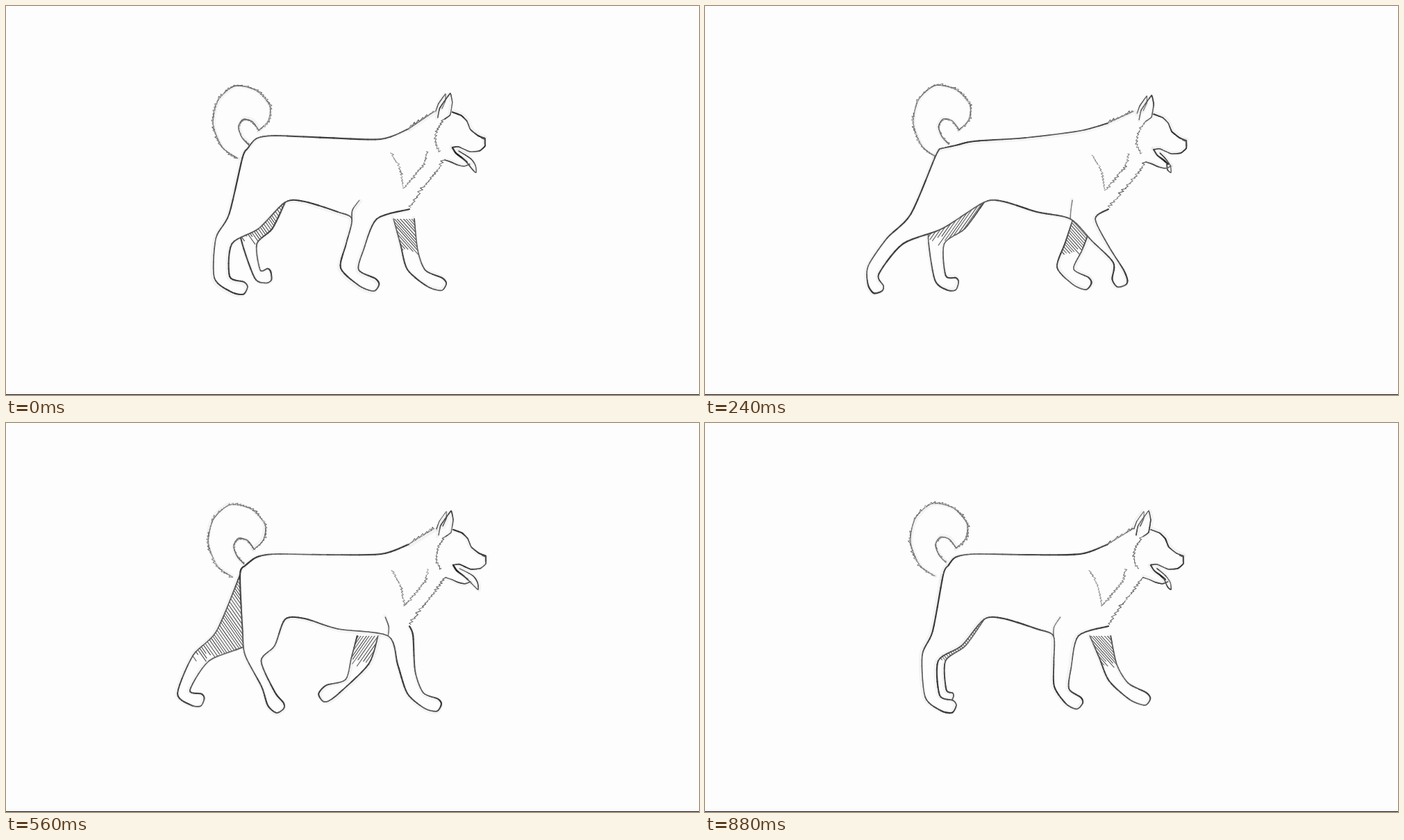
These frames come from a looping animation (998 by 561 pixels, 0.96 s). An HTML page with a canvas:

```html
<!DOCTYPE html>
<html lang="en">
<head>
<meta charset="utf-8">
<title>Walking dog</title>
<style>
  html, body { margin: 0; width: 100%; height: 100%; overflow: hidden; background: #fdfdfd; }
  canvas { display: block; }
</style>
</head>
<body>
<canvas id="stage" width="998" height="561"></canvas>
<script>
const ctx = document.getElementById('stage').getContext('2d');
const PAPER = '#fdfdfd', TICK = 80, TICKS = 12;

// Gait: heel and toe tip of each foot at the key ticks; everything else follows by rule
const KEY_TICKS = [0, 1, 3, 5, 7, 9, 11];
const GAIT = {
  nearHind: [[300,392, 346,410], [259,388, 301,410], [235,375, 250,413], [294,380, 304,405],
    [368,380, 396,415], [346,398, 390,413], [317,395, 360,412]],
  farHind: [[358,392, 382,388], [370,393, 403,402], [331,395, 364,403], [278,388, 325,406],
    [247,390, 284,402], [243,372, 238,402], [334,388, 355,400]],
  nearFront: [[482,378, 535,406], [482,370, 451,393], [588,370, 601,404], [596,372, 650,414],
    [578,390, 625,410], [535,385, 579,406], [503,380, 541,408]],
  farFront: [[578,380, 632,405], [555,380, 610,406], [507,377, 554,404], [478,375, 525,404],
    [489,370, 453,397], [580,372, 611,396], [582,372, 639,402]]
};
const FLANK = [402, 283], CHEST = [581, 293];

const add = ([x, y], dx, dy) => [x + dx, y + dy];
const mix = (a, b, f) => a.map((v, k) => v + (b[k] - v) * f);
const shift = (pts, [dx, dy]) => pts.map(p => add(p, dx, dy));

let seed = 1;
const rand = () => (seed = seed * 16807 % 2147483647) / 2147483647;

function footAt(name, tick) {
  const i = KEY_TICKS.findLastIndex(k => k <= tick), next = (i + 1) % KEY_TICKS.length;
  const from = KEY_TICKS[i], to = KEY_TICKS[next] || TICKS;
  const [hx, hy, tx, ty] = mix(GAIT[name][i], GAIT[name][next], (tick - from) / (to - from));
  return { heel: [hx, hy], tip: [tx, ty] };
}

// Paw outline from heel round the sole and toes to the instep
function paw({ heel, tip }) {
  const dx = tip[0] - heel[0], dy = tip[1] - heel[1], length = Math.hypot(dx, dy);
  const at = (along, down) =>
    add(heel, dx * along - dy / length * down, dy * along + dx / length * down);
  return [heel, at(0.6, 10), at(0.96, 7), at(1, -5), at(0.85, -10), at(0.4, -10)];
}

function hindLeg(rump, foot) {
  const hock = [306 + (foot.heel[0] - 306) * 0.62, 335], shin = add(hock, 23, 8);
  return [rump, [(rump[0] + hock[0]) / 2, 300], hock, ...paw(foot), shin,
    add(mix(shin, FLANK, 0.45), 4, 5), FLANK];
}

function frontLeg(elbow, foot, width) {
  const middle = mix(elbow, foot.heel, 0.5);
  return [elbow, middle, ...paw(foot), add(middle, 25, 9), add(elbow, width, 0)];
}

// Smooth polyline through the points
function curve(pts, tension = 0.4, steps = 7) {
  const out = [];
  for (let i = 0; i < pts.length - 1; i++) {
    const p = pts[i], q = pts[i + 1], before = pts[i - 1] || p, after = pts[i + 2] || q;
    for (let s = 0; s < steps; s++) {
      const t = s / steps, t2 = t * t, t3 = t2 * t;
      out.push([0, 1].map(k =>
        (2 * t3 - 3 * t2 + 1) * p[k] + (3 * t2 - 2 * t3) * q[k] +
        (t3 - 2 * t2 + t) * tension * (q[k] - before[k]) + (t3 - t2) * tension * (after[k] - p[k])));
    }
  }
  return [...out, pts[pts.length - 1]];
}

function trace(pts) {
  ctx.beginPath();
  pts.forEach(p => ctx.lineTo(...p));
}

function line(pts, width, tone) {
  ctx.lineWidth = width;
  ctx.strokeStyle = `rgb(${tone},${tone},${tone})`;
  trace(pts);
  ctx.stroke();
}

// Pencil line with uneven pressure and a faint smudge
function pencil(pts, width = 1.8, tone = 82, tension = 0.4) {
  const path = curve(pts, tension), phase = rand() * 6;
  ctx.globalAlpha = 0.07;
  line(shift(path, [rand() * 4 - 2, rand() * 4 - 2]), 5, 110);
  ctx.globalAlpha = 1;
  for (let i = 1; i < path.length; i++) {
    const press = Math.sin(i * 0.23 + phase) * 0.6 + rand() * 0.4;
    line([path[i - 1], path[i]], width * (1 + press * 0.22), tone - press * 28);
  }
}

// Short overlapping hairs along a curve
function fur(pts, side = 1, size = 3, tone = 120) {
  let last;
  for (const p of curve(pts, 0.4, 16)) {
    if (last) {
      const dx = p[0] - last[0], dy = p[1] - last[1], d = Math.hypot(dx, dy);
      if (d < 4) continue;
      const h = side * size * (0.2 + rand() * 0.9) / d;
      line([last, [p[0] + dy * h, p[1] - dx * h], p], 0.9 + rand() * 0.5, tone + rand() * 40 - 20);
    }
    last = p;
  }
}

function farLeg(pts, slope, top, end) {
  trace(curve(pts));
  ctx.fillStyle = PAPER;
  ctx.fill();
  ctx.save();
  ctx.clip();
  for (let x = 120; x < 760; x += 3.5 + rand() * 1.4) {
    const y = end - rand() * 14;
    line([[x, top], [x + slope * (y - top), y]], 1.2, 80 + rand() * 35);
  }
  ctx.restore();
  pencil(pts, 1.7, 88);
}

function drawTail(offset) {
  const outer = shift([[334,219],[312,203],[299,170],[306,136],[330,115],[360,121],[380,143],[378,165],[363,180]], offset);
  const inner = shift([[365,179],[355,166],[342,163],[335,174],[340,189],[350,200]], offset);
  pencil(outer, 0.9, 140);
  fur(outer, 1, 3, 120);
  pencil(inner, 1.1, 105);
  fur(inner, 1, 2, 125);
}

function drawHead(offset, tongueSwing) {
  const at = pts => shift(pts, offset);
  pencil(at([[619,152],[623,141],[633,127],[633,137],[628,148]]), 1.1, 105, 0.15);
  pencil(at([[622,161],[625,147],[640,126],[643,139],[640,157],[632,163]]), 1.4, 85, 0.15);
  pencil(at([[643,153],[656,158],[664,166],[669,178],[680,187],[690,191]]), 1.7, 75, 0.2);
  pencil(at([[690,191],[690,202],[682,209],[668,210],[652,203],[643,204]]), 1.5, 75, 0.25);
  line(at([[685,190],[690,192],[690,199]]), 2.2, 80);
  pencil(at([[643,204],[648,212],[657,219],[664,225]]), 2, 60);
  const [root, under] = at([[652,209],[662,223]]), x = 674 + 6 * tongueSwing, y = 240;
  pencil([root, [x - 8, y - 20], [x - 1, y - 10], [x, y], [x - 5, y - 4], under], 1.3, 90);
  pencil(at([[632,222],[641,225],[650,229],[660,231],[668,228]]), 1.4, 90);
  fur(at([[632,163],[622,180],[620,198],[628,212]]), -1, 3, 115);
}

function draw(tick) {
  seed = 7919 * (tick + 1);
  const wave = (peak, cycles = 1) => Math.cos(2 * Math.PI * cycles * (tick - peak) / TICKS);
  const sway = wave(4), reach = wave(6), tilt = wave(3, 2), wag = wave(2);

  const rump = [337 - 7 * sway, 219];
  const back = [add(rump, 7, -13), [361, 196 + 5 * tilt], [388, 191 + 4 * tilt], [462, 190],
    [540, 186 - 6 * tilt], [580, 173 - 4 * tilt], [617, 152]];
  const foot = name => footAt(name, tick);
  const elbow = [526 + 28 * reach, 307];
  const near = [back[0], ...hindLeg(rump, foot('nearHind')), [430, 282], [478, 297],
    ...frontLeg(elbow, foot('nearFront'), 36), CHEST];

  const head = [1 + 2.5 * sway, 1.5 + 1.5 * tilt];
  const throat = shift([[632,222],[622,238],[606,257]], head);
  const hindFoot = foot('farHind'), frontFoot = foot('farFront');

  ctx.fillStyle = PAPER;
  ctx.fillRect(0, 0, 998, 561);
  drawTail([5 * wag - 3, 1.5 - 2 * wag]);
  farLeg(hindLeg(rump, hindFoot), sway > 0.5 ? -0.7 : 0.7, 215, 345);
  farLeg(frontLeg([530 - 28 * reach, 307], frontFoot, 30), reach > 0.5 ? -0.7 : 0.9, 285, frontFoot.heel[1] - 16);

  trace([...curve(back), ...shift([[640,160],[626,198]], head), ...throat, ...curve(near).reverse()]);
  ctx.fillStyle = PAPER;
  ctx.fill();
  pencil(back.slice(0, 6), 1.8, 80);
  pencil(back.slice(5), 1, 125);
  fur(back.slice(5), 1, 3, 115);
  pencil(near);

  pencil([elbow, add(elbow, 1, -13), add(elbow, 3 - 8 * reach, -27)], 1.2, 105);
  fur([...throat, CHEST], -1, 4, 115);
  fur(shift([[554,212],[566,234],[572,263]], head), 1, 3, 145);
  fur(shift([[572,263],[591,240],[602,226],[606,208]], head), -1, 3, 135);
  drawHead(head, wave(1, 2));

  ctx.fillStyle = '#111';
  ctx.fillRect(0, 560, 998, 1);
}

ctx.lineCap = ctx.lineJoin = 'round';
let shown = -1;
function play() {
  const tick = Math.floor(performance.now() / TICK) % TICKS;
  if (tick !== shown) draw(shown = tick);
  requestAnimationFrame(play);
}
play();
</script>
</body>
</html>
```
